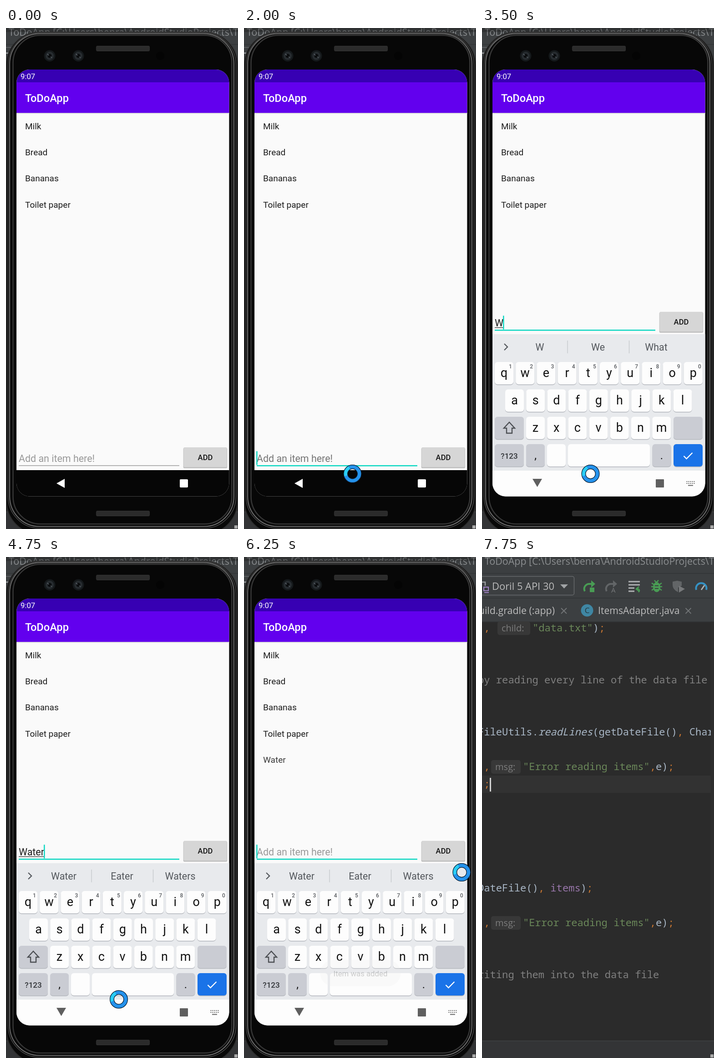
Recreate the animation shown at these times as an HTML page. Size 510 by 1098 pixels, loop 8000 ms.

```html
<!DOCTYPE html>
<html lang="en">
<head>
<meta charset="utf-8">
<title>ToDoApp</title>
<style>
  html, body { margin: 0; height: 100%; overflow: hidden; background: #2b2b2b; }
  svg { display: block; font-family: Roboto, sans-serif; }
  text { white-space: pre; }
  .ui { font-family: "Open Sans", sans-serif; }
  .code { font-family: "Noto Sans Mono", monospace; font-size: 22.13px; }
</style>
</head>
<body>
<svg id="stage" width="510" height="1098" viewBox="0 0 510 1098"></svg>
<script>
const LOOP = 8000, STEP = 250;
const stage = document.getElementById('stage');
const ruler = document.createElement('canvas').getContext('2d');

const rect = (x, y, w, h, fill, rx = 0, more = '') =>
  `<rect x="${x}" y="${y}" width="${w}" height="${h}" rx="${rx}" fill="${fill}" ${more}/>`;
const circle = (x, y, r, fill, more = '') => `<circle cx="${x}" cy="${y}" r="${r}" fill="${fill}" ${more}/>`;
const shape = (d, fill) => `<path d="${d}" fill="${fill}"/>`;
const line = (d, color, w = 2, more = '') =>
  `<path d="${d}" fill="none" stroke="${color}" stroke-width="${w}" ${more}/>`;
const text = (x, y, str, size, fill, more = '') =>
  `<text x="${x}" y="${y}" font-size="${size}" fill="${fill}" ${more}>${str}</text>`;
const MID = 'text-anchor="middle"', BOLD = 'font-weight="500"', UI = 'class="ui"';

// Latest value whose start step has been reached.
const at = (step, keys) => keys.filter(k => k[0] <= step).pop()[1];
const widthOf = str => {
  ruler.font = '21.43px Roboto, sans-serif';
  return ruler.measureText(str).width;
};

// ---------- code editor ----------
const C = { n: '#a9b7c6', o: '#cc7832', s: '#6a8759', c: '#808080', p: '#9876aa' };
const code = (x, y, ...parts) => `<text class="code" x="${x}" y="${y}">` + parts.map(([kind, str, style = '']) =>
  `<tspan fill="${C[kind]}" ${style}>${str}</tspan>`).join('') + '</text>';
const badge = (x, y, w, label) =>
  rect(x, y - 15, w, 30, '#383838', 5) + text(x + 9, y + 7, label, 20, '#7d7d7d', UI);
const logLine = y => code(4, y + 7, ['o', ',']) + badge(20, y, 65, 'msg:') +
  code(90, y + 7, ['s', '"Error reading items"'], ['o', ','], ['n', 'e)'], ['o', ';']);
const cross = x => line(`M${x - 6} 112l12 12m0-12l-12 12`, '#737678', 1.8);
const rerun = (x, color) => line(`M${x - 10} 75a11 11 0 0 1 11-16h7`, color, 4) +
  shape(`M${x + 4} 51l9 8-9 8z`, color);

const toolbar = () =>
  rect(-10, 42.5, 212.5, 41, '#3c3f41', 4, 'stroke="#66696b" stroke-width="1.5"') +
  line('M0 55h7v8', '#9a9da0', 2.5) + rect(4, 66, 10, 8, 'none', 0, 'stroke="#a386c8" stroke-width="2"') +
  line('M5 78h10', '#a386c8') + text(22, 72, 'Doril 5 API 30', 21.9, '#bbb', UI) +
  shape('M172 60h17l-8.5 9z', '#a0a3a5') +
  rerun(236, '#499c54') + rect(237, 67, 10, 10, '#499c54') +
  rerun(284, '#626567') + text(284, 78, 'A', 15, '#77797b', UI) +
  line('M322 54h25M322 61h25M322 68h13M322 75h13', '#afb1b3', 3) +
  line('M340 70h4a4 4 0 0 1 0 7M345 65l-6 5 6 5', '#499c54', 2.5) +
  line('M373 57l22 16M395 57l-22 16M372 65h24M379 51l4 5 5-5', '#499c54', 2.5) +
  `<ellipse cx="384" cy="66" rx="8" ry="11" fill="#499c54"/>` + line('M380 63h8M380 69h8', '#3c3f41') +
  shape('M419 54l10-2 10 2v9l-8 4v10q-12-6-12-15z', '#626567') + shape('M433 63l13 7-13 8z', '#77797b') +
  line('M471 72a11.5 11.5 0 1 1 22 0', '#3592c4', 4) + line('M482 72l7-10', '#afb1b3', 3);

const editor = () =>
  rect(0, 0, 510, 1098, '#2b2b2b') + rect(0, 0, 510, 142, '#3c3f41') +
  line('M0 36h510M0 90h510M0 142h510', '#323537', 1.5) +
  text(6, 17, 'ToDoApp [C:\\Users\\benra\\AndroidStudioProjects\\ToDoApp]', 21.4, '#8b8e90', UI) +
  toolbar() +
  text(160, 125, 'build.gradle (:app)', 21.4, '#bbb', UI + ' text-anchor="end"') + cross(180) +
  circle(231, 117, 13.5, '#3f86a3') + text(231, 123, 'C', 17, '#263238', UI + MID) +
  text(255, 125, 'ItemsAdapter.java', 21.2, '#bbb', UI) + cross(453.5) +
  rect(0, 479, 503, 38, '#323232') +
  code(4, 163, ['o', ',']) + badge(34, 156, 72, 'child:') +
  code(111, 163, ['s', '"data.txt"'], ['n', ')'], ['o', ';']) +
  code(-9, 277, ['c', 'by reading every line of the data file']) +
  code(-9, 391, ['n', 'FileUtils.'], ['n', 'readLines', 'font-style="italic"'],
    ['n', '(getDateFile()'], ['o', ', '], ['n', 'Charset.defaultCharset()']) +
  logLine(460) + code(4, 505, ['o', ';']) + rect(17, 484, 3, 30, '#d0d0d0') +
  code(-9, 733, ['n', 'DateFile()'], ['o', ', '], ['p', 'items'], ['n', ')'], ['o', ';']) +
  logLine(802) + code(-9, 923, ['c', 'riting them into the data file']) +
  rect(503, 142, 7, 919, '#2e2e2e') + rect(0, 1060, 510, 38, '#333436') +
  line('M0 1060.5h510', '#45474a', 1);

// ---------- phone ----------
const camera = x => circle(x, 61, 12.5, '#15191b') + circle(x, 61, 9, '#272c30') + circle(x, 61, 4.5, '#0b0d0f') +
  line(`M${x - 5} 57l3 3M${x + 2} 63l3 2`, '#626b71', 1.5);
const speaker = y => rect(198, y, 118, 12, '#303030', 3) +
  line(`M199 ${y + 3}h116M199 ${y + 6}h116M199 ${y + 9}h116`, '#171717', 1, 'stroke-dasharray="1.5 1.5"');
const body = () =>
  rect(0, 0, 510, 9, 'rgba(20,20,20,.3)') +
  rect(1, 9, 508, 1100, '#090909', 72, 'stroke="#2c2c2c" stroke-width="2"') +
  rect(8, 12.5, 493, 1080, 'none', 66, 'stroke="#6f6f6f" stroke-width="2"') +
  rect(4.5, 10.5, 501, 1086, 'none', 70, 'stroke="#4a4a4a" stroke-width="1.5"') +
  rect(15.5, 16, 481, 1071, '#070707', 60, 'stroke="#363636" stroke-width="2.5"') +
  rect(18, 19, 475, 1065, '#070707', 57) +
  camera(96) + camera(159) + circle(339, 61, 9, '#040404') + speaker(39) + speaker(1058);

// ---------- keyboard ----------
const GREY = '#caccd3';
const key = (x, y, w, label = '', fill = '#fdfdfd', size = 27) =>
  rect(x, y + 1.5, w, 49, '#b4b7bd', 6) + rect(x, y, w, 49, fill, 6) +
  text(x + w / 2, y + 32.5, label, size, '#111', MID);
const row = (letters, x, y) => [...letters].map((ch, i) => key(x + 46.2 * i, y, 41, ch)).join('');

const suggestionBar = words => words
  ? line('M49 692l7 7-7 7', '#55595e', 2.4) + line('M188 685v28M323.5 685v28', '#c3c6ca', 1.3) +
    words.map((w, i) => text(127 + 128 * i, 707, w, 21.43, '#53575c', MID)).join('')
  : line('M57 692l-7 7 7 7', '#55595e', 2.4) + line('M357 685v28', '#d0d2d6', 1.3);

const keyboard = (words, drop) => `<g transform="translate(0 ${drop})">` +
  rect(23, 671, 468, 300, '#e8eaed') + suggestionBar(words) +
  row('qwertyuiop', 28, 732) +
  [...'1234567890'].map((d, i) => text(62.5 + 46.2 * i, 746, d, 12, '#5a5d61', MID + BOLD)).join('') +
  row('asdfghjkl', 51, 792) + key(28, 852, 64, '', GREY) + row('zxcvbnm', 97, 852) + key(421, 852, 64, '', GREY) +
  line('M60 864l-12 13h6v11h12v-11h6z', '#4c4f53', 2.4) +
  key(28, 912, 64, '', GREY) + text(60, 944, '?123', 17, '#33363a', MID + BOLD) +
  key(97, 912, 41, ',', GREY, 24) + key(143, 912, 41) + key(189, 912, 180) +
  key(374.5, 912, 41, '.', GREY, 24) + key(421, 912, 64, '', '#1a73e8') +
  line('M443.5 938l6 6 13-13', '#fff', 2.3) + '</g>';

const lightNav = () => rect(23, 970, 468, 57, '#fdfdfd') +
  shape('M111 988h21l-10.5 18z', '#5f5f5f') + rect(382, 989, 18, 18, '#5f5f5f', 1) +
  line('M449.5 994h18M449.5 998h18', '#666', 2, 'stroke-dasharray="2 2"') + line('M453 1002.5h11', '#666');
const darkNav = () => rect(23, 969, 468, 58, '#060606') +
  shape('M111 998l18-10v20z', '#fff') + rect(382, 989, 18, 18, '#fff', 2);

// ---------- app ----------
const appBar = () => rect(23, 91, 468, 28, '#3700b3') + rect(23, 186, 468, 2, '#d9d9de') +
  rect(23, 119, 468, 67, '#6200ee') + text(32, 111.5, '9:07', 16.7, '#fff') +
  text(42, 162, 'ToDoApp', 23.6, '#fff', BOLD);

const button = (y, pressed) =>
  rect(389.5, y + 1, 97, pressed ? 48 : 45, pressed ? '#c6c6c6' : '#dadada', 3) +
  rect(390, y + (pressed ? 2.5 : 1.5), 96, 44, '#bcbcbc', 2) +
  rect(390.5, y, 95, 43.5, pressed ? '#c4c4c4' : '#d6d6d6', 2) + text(438, y + 28, 'ADD', 16.7, '#161616', MID + BOLD);

function inputRow(step, open) {
  const y = open ? 622 : 919, focused = step >= 8;
  const typed = at(step, [[0, ''], [14, 'W'], [15, 'Wa'], [16, 'Wat'], [17, 'Water'], [25, '']]);
  const composed = step === 17 || step === 18 ? 'Wate' : typed;
  const caretOn = at(step, [[0, 0], [8, 1], [10, 0], [12, 1], [20, 0], [22, 1], [27, 0], [29, 1]]);
  const hintColor = step === 8 ? '#757575' : '#999';
  return (focused ? rect(28, y + 39, 353, 2.6, '#14d8c4') : rect(28, y + 39.5, 353, 1.2, '#858585')) +
    (typed ? text(28, y + 31.5, typed, 21.43, '#1c1c1c') + rect(28, y + 34, widthOf(composed), 1.3, '#333')
           : text(28, y + 31.5, 'Add an item here!', 21.43, hintColor)) +
    (caretOn ? rect(27 + widthOf(typed), y + 8.5, 2.6, 30, '#14d8c4') : '') +
    button(y, step === 24);
}

const toast = alpha => `<g opacity="${alpha}">` + rect(167.5, 883, 177, 58, '#eee', 29) +
  text(256, 918.5, 'Item was added', 16.8, '#222', MID) + '</g>';

const pointer = ([x, y]) => `<g transform="translate(${x} ${y})">` +
  circle(0, 0, 15.2, 'none', 'stroke="#2492ec" stroke-width="9"') +
  line('M-15 4.5A15.5 15.5 0 0 1-7-13.8', '#29cdf5', 8) +
  circle(0, 0, 19.4, 'none', 'stroke="#0a1a2c" stroke-width="1.2"') +
  circle(0, 0, 10.8, 'none', 'stroke="#0a1a2c" stroke-width="1.2"') + '</g>';

function phone(step) {
  const open = step >= 9;
  const words = at(step, [[0, ''], [14, 'W We What'], [16, 'Wa Was Way'], [17, 'Wat What Way'],
    [18, 'Wate Water Wage'], [19, 'Water Eater Waters'], [27, '']]);
  const items = ['Milk', 'Bread', 'Bananas', 'Toilet paper', ...(step >= 25 ? ['Water'] : [])];
  const toastAlpha = at(step, [[0, 0], [25, .22], [26, .85], [27, 1]]);
  const spot = at(step, [[0, null], [1, [278, 1034]], [2, [250, 988]], [3, [238.5, 977]], [19, [248, 969.5]],
    [20, [406, 841]], [21, [491, 717]], [22, [486, 695]], [23, [478.5, 691]], [27, null]]);
  return body() + '<clipPath id="screen">' + rect(23, 91, 467.5, 935.5, '#000', 29) + '</clipPath>' +
    '<g clip-path="url(#screen)">' + rect(23, 91, 468, 936, '#fafafa') + appBar() +
    items.map((item, i) => text(42, 222 + 57.2 * i, item, 19.05, step === 25 && i === 4 ? '#3a3a3a' : '#1c1c1c')).join('') +
    inputRow(step, open) +
    (open ? keyboard(words && words.split(' '), step === 9 ? 24 : 0) + lightNav() : darkNav()) +
    (toastAlpha ? toast(toastAlpha) : '') + '</g>' + (spot ? pointer(spot) : '');
}

let shown = -1;
function tick(now) {
  const step = Math.floor(now % LOOP / STEP);
  if (step !== shown) {
    shown = step;
    stage.innerHTML = editor() + (step < 31 ? phone(step) : '') + rect(502, 1090, 7, 7, '#a9a9a9');
  }
  requestAnimationFrame(tick);
}
tick(0);
</script>
</body>
</html>
```
